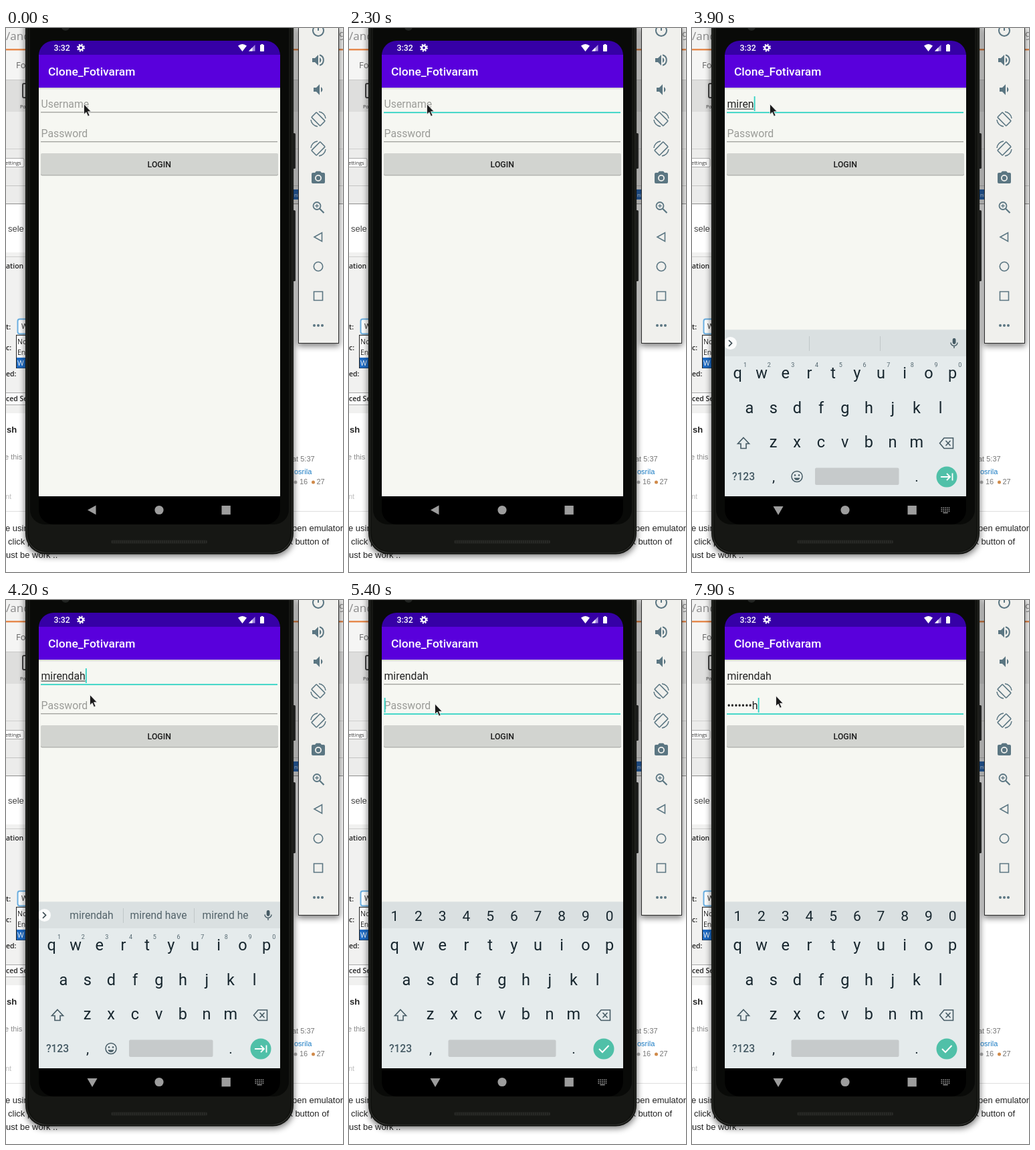
Recreate the animation shown at these times as an HTML page. Size 504x812 px, loop 8 s.

```html
<!DOCTYPE html>
<html lang="en">
<head>
<meta charset="utf-8">
<title>Login typing</title>
<style>
  html, body { margin: 0; width: 100%; height: 100%; overflow: hidden; background: #fff; }
  svg { display: block; width: 504px; height: 812px; }
  text { white-space: pre; }
  .r { font-family: Roboto, sans-serif; }
  .m { font-family: Roboto, sans-serif; font-weight: 500; }
  .a { font-family: "Liberation Sans", Arial, sans-serif; }
  .o { font-family: "Open Sans", sans-serif; }
  .mid { text-anchor: middle; }
</style>
</head>
<body>
<svg id="stage" viewBox="0 0 504 812" xmlns="http://www.w3.org/2000/svg"></svg>
<script>
const LOOP = 8000;
const USER = 'mirendah';
const TEAL = '#2fd3c4';
const stage = document.getElementById('stage');

const rect = (x, y, w, h, fill, extra = '') =>
  `<rect x="${x}" y="${y}" width="${w}" height="${h}" fill="${fill}" ${extra}/>`;
const text = (x, y, size, fill, str, cls = 'a', extra = '') =>
  `<text x="${x}" y="${y}" font-size="${size}" fill="${fill}" class="${cls}" ${extra}>${str}</text>`;
const circle = (x, y, r, fill, extra = '') =>
  `<circle cx="${x}" cy="${y}" r="${r}" fill="${fill}" ${extra}/>`;
const path = (d, fill, extra = '') => `<path d="${d}" fill="${fill}" ${extra}/>`;
const line = (d, color, width = 1.6) => path(d, 'none', `stroke="${color}" stroke-width="${width}"`);
const group = (id, body, extra = '') => `<g id="${id}" ${extra}>${body}</g>`;
const shadow = (x, y, w, h, r) =>
  rect(x - 1, y + 2, w + 2, h + 2, '#000', `rx="${r}" opacity=".5" filter="url(#soft)"`);

function backdrop() {
  return rect(0, 0, 504, 812, '#fff')
    + rect(0, 0, 504, 31, '#f2f2f1')
    + rect(0, 34, 504, 44, '#f5f5f4')
    + rect(0, 78, 504, 47, '#dededd')
    + rect(0, 125, 504, 137, '#ececeb')
    + rect(0, 31, 504, 2.5, '#e58a4e')
    + rect(0, 77, 504, 1, '#c8c8c7')
    + rect(0, 180, 504, 1, '#d0d0cf')
    + rect(0, 235, 504, 1, '#c4c4c3')
    + rect(0, 262, 504, 1, '#8e8e8d')
    + rect(0, 335, 32, 240, '#f1f1f0')
    + rect(0, 341, 32, 1, '#cfcfce')
    + rect(0, 721, 504, 1, '#dedede')
    + text(0, 18, 17, '#8a8a8a', '/and', 'o')
    + text(498, 18, 16, '#8a8a8a', '97', 'o')
    + text(15, 60, 13, '#666', 'Fo', 'o')
    + rect(25, 83, 12, 21, 'none', 'rx="2" stroke="#444" stroke-width="2"')
    + text(21, 119.5, 7, '#333', 'Po', 'o')
    + rect(-5, 194.5, 32, 13, '#fff', 'rx="2" stroke="#aaa"')
    + text(-1, 204, 7.5, '#333', 'ettings', 'o')
    + text(3, 304, 13, '#444', 'sele')
    + text(0, 359, 10.5, '#222', 'ation', 'o', 'font-weight="600"')
    + text(0, 450, 10.5, '#222', 't:', 'o', 'font-weight="600"')
    + rect(17.5, 434.5, 20, 22, '#fff', 'rx="3" stroke="#6aaee0" stroke-width="2"')
    + text(23, 449, 10.5, '#222', 'W', 'o')
    + rect(15.5, 458.5, 20, 49, '#fff', 'stroke="#222"')
    + rect(16, 492, 19, 15.5, '#1f6cc5')
    + text(17, 472, 10.5, '#222', 'No', 'o')
    + text(17, 488, 10.5, '#222', 'En', 'o')
    + text(17, 504, 10.5, '#fff', 'W', 'o')
    + text(0, 481, 10.5, '#222', 'c:', 'o', 'font-weight="600"')
    + text(0, 520, 10.5, '#222', 'ed:', 'o', 'font-weight="600"')
    + rect(-5, 544.5, 45, 18, '#fafafa', 'rx="2" stroke="#aaa"')
    + text(0, 557, 10.5, '#222', 'ced Se', 'o', 'font-weight="600"')
    + text(1, 604, 13, '#222', 'sh', 'a', 'font-weight="700"')
    + text(-2, 644, 11, '#8a8a8a', 'e this')
    + text(-1, 703, 11, '#c0c0c0', 'nt')
    + text(-1, 751, 13, '#222', 'e using')
    + text(3, 771, 13, '#222', 'click p')
    + text(0, 791, 13, '#222', 'ust be work ..')
    + rect(430, 241, 10, 15, '#2a66b0')
    + text(431, 252, 8, '#fff', 'ni', 'o')
    + text(428, 647, 11, '#777', 'at 5:37')
    + text(431, 666, 11, '#1b7cc4', 'osrila')
    + circle(433, 678, 2.5, '#aaa') + text(439, 681, 11, '#777', '16')
    + circle(459.5, 678, 2.5, '#d08a4a') + text(464.5, 681, 11, '#777', '27')
    + text(504, 751, 13, '#222', 'open emulator', 'a', 'text-anchor="end"')
    + text(483, 771, 13, '#222', 'k button of', 'a', 'text-anchor="end"');
}

function phone() {
  let grille = '';
  for (let x = 158; x < 301; x += 3) grille += rect(x, 765, 1.5, 4, '#2c2d2a');
  return shadow(29, -40, 401, 825, 31)
    + rect(429, 157, 4, 53, '#252624', 'rx="1.5"')
    + rect(429, 272, 4, 106, '#252624', 'rx="1.5"')
    + rect(29, -40, 401, 825.5, '#11120f', 'rx="31"')
    + rect(31, -40, 397, 823, 'none', 'rx="29" stroke="#30312e" stroke-width="1.2"')
    + rect(34, -40, 391, 821, '#161714', 'rx="26"')
    + rect(36, -40, 387, 781, '#090a08', 'rx="22"')
    + circle(89, -2, 6, '#222422')
    + rect(157, 764, 144, 6, '#1d1e1b', 'rx="3"') + grille
    + rect(49, 19, 361, 722, '#000', 'rx="22"');
}

function statusBar() {
  const teeth = 'stroke="#fff" stroke-width="2" stroke-dasharray="2 1.93"';
  return rect(49, 19, 361, 21, '#3600a6')
    + text(71.5, 34, 12.3, '#fff', '3:32', 'm')
    + circle(112, 29.5, 3.1, 'none', 'stroke="#fff" stroke-width="2.4"')
    + circle(112, 29.5, 5, 'none', teeth)
    + path('M347 26.5Q353.5 21.500 360 26.500L353.500 35z', '#fff')
    + path('M363 34.500L372.500 25V34.500z', '#a58be0')
    + path('M363 34.500L368.500 29V34.500z', '#fff')
    + rect(380, 25, 6, 10, '#fff', 'rx=".8"') + rect(381.7, 24, 2.6, 2, '#fff');
}

function app() {
  return rect(49, 40, 361, 659, '#f6f7f2')
    + rect(49, 89, 361, 3.5, 'url(#fade)')
    + rect(49, 40, 361, 49, '#5900dc')
    + statusBar()
    + text(63, 71, 17.4, '#fff', 'Clone_Fotivaram', 'm')
    + rect(52, 188, 355, 32.5, '#b4b5b1', 'rx="2"')
    + rect(52, 187, 355, 32, '#d2d4d0', 'rx="2"')
    + text(229.3, 207.5, 12.3, '#1c1c1c', 'LOGIN', 'm mid');
}

function field(id, y, hint) {
  return text(52.5, y, 15.8, '#9b9c98', hint, 'r', `id="${id}Hint"`)
    + text(52.5, y, 15.8, '#222', '', 'r', `id="${id}Text"`)
    + rect(52.5, y + 1.5, 0, 1, '#222', `id="${id}Mark"`)
    + rect(52, y + 6.3, 354, 1, '#858682', `id="${id}Line"`)
    + rect(53, y - 17, 1.8, 22, TEAL, `id="${id}Caret"`);
}

function keyboard() {
  const ink = '#17262e', soft = '#455a64', pitch = 35.7;
  const row = (str, x, y, size) => [...str].map((c, i) =>
    text(x + i * pitch, y, size, ink, c, 'r mid')).join('');
  const small = [...'1234567890'].map((c, i) =>
    text(79.5 + i * pitch, 506, 9, '#53666f', c, 'r mid')).join('');
  const words = [USER, 'mirend have', 'mirend he'].map((w, i) =>
    text(128 + i * 100, 476, 15.6, '#53636a', w, 'r mid')).join('');

  const suggest = circle(57.5, 470.5, 9.5, '#fbfcfc')
    + line('M55 466l4.500 4.500-4.500 4.500', '#37474f', 1.7)
    + rect(175, 460, 1, 22, '#c0c7c8') + rect(281, 460, 1, 22, '#c0c7c8')
    + rect(389.7, 463, 4.8, 9, soft, 'rx="2.4"')
    + line('M387 469.500a5 5 0 0 0 10 0M392 474.500v3.500', soft, 1.4);
  const face = circle(157, 669.5, 8, 'none', `stroke="${soft}" stroke-width="1.5"`)
    + circle(154, 667.5, 1.3, soft) + circle(160, 667.5, 1.3, soft)
    + path('M152.500 671.500h9a4.700 4.700 0 0 1-9 0z', soft);

  return rect(49, 450.5, 361, 248.5, '#e5ebec')
    + rect(49, 450.5, 361, 39.5, '#dae0e1')
    + row('qwertyuiop', 68.3, 522.7, 23.5)
    + row('asdfghjkl', 86, 574.7, 23.5)
    + row('zxcvbnm', 121.5, 626.3, 23.5)
    + line('M77 611.500l8.500 9h-4.500v7h-8v-7h-4.500z', soft)
    + line('M377 612h13.500v15.500h-13.500l-6.500-7.750zM379.500 616l7 7.500m0-7.500l-7 7.500', soft)
    + text(77, 675, 15.6, soft, '?123', 'm mid')
    + text(122, 677, 21, ink, ',', 'r mid') + text(336, 677, 21, ink, '.', 'r mid')
    + circle(381, 670, 15.5, '#50c0a8')
    + group('wordKeys', suggest + group('words', words) + small + face
      + rect(184, 656.5, 125.5, 25.5, '#c6cacb', 'rx="2"')
      + line('M372 670h14m-5-5l5 5-5 5M389.500 664.500v11', '#fff', 1.8))
    + group('passKeys', row('1234567890', 68.3, 479, 21)
      + rect(148.5, 656.5, 161, 25.5, '#c6cacb', 'rx="2"')
      + line('M374 670l5 5 9.500-10', '#fff', 2));
}

function navBar() {
  const grey = '#9d9d9d';
  let keys = '';
  for (let i = 0; i < 15; i++)
    keys += rect(372.5 + (i % 5) * 2.8, 715.5 + Math.floor(i / 5) * 2.6, 1.6, 1.5, grey);
  return path('M122 719.500L134.500 712.500V726.500z', grey, 'id="back"')
    + path('M121.500 714H136.500L129 727z', grey, 'id="down"')
    + circle(229, 719.5, 6.6, grey)
    + rect(322.5, 713, 13.3, 13.3, grey)
    + group('switcher', keys + rect(375.5, 723, 7.2, 1.3, grey));
}

function toolbar() {
  const c = '#5b7682';
  const at = (y, body) => `<g transform="translate(467 ${y})">${body}</g>`;
  const speaker = x => path(`M${x} -3h4l5-5v16l-5-5h-4z`, c);
  const wave = x => path(`M${x} -4a4.500 4.500 0 0 1 0 8z`, c);
  const turn = s => `<g transform="scale(${s} 1)">`
    + rect(-5.2, -9.2, 10.4, 18.4, 'none', `rx="1" stroke="${c}" stroke-width="1.6" transform="rotate(-45)"`)
    + line('M1-11a11 11 0 0 1 10 10M-1 11a11 11 0 0 1-10-10', c, 1.5) + '</g>';
  return shadow(437, -2, 61, 473, 1)
    + rect(437.5, -2, 60, 472.5, '#f0f0ed', 'stroke="#2b2b2b"')
    + at(4, line('M-4.800-6.500a8 8 0 1 0 9.600 0M0-10v10', c, 2))
    + at(48, speaker(-9) + wave(2) + line('M2 -7.700a8 8 0 0 1 0 15.400', c, 2))
    + at(92, speaker(-7) + wave(4))
    + at(136, turn(1)) + at(180, turn(-1))
    + at(224, rect(-10, -8, 20, 16, c, 'rx="2"') + path('M-5-8l2-2.200h6l2 2.200z', c)
      + circle(0, 0, 4.1, c, 'stroke="#f0f0ed" stroke-width="1.8"'))
    + at(268, circle(-2, -2.5, 5.5, 'none', `stroke="${c}" stroke-width="1.8"`)
      + line('M2 1.500l6.500 6.500', c, 2.2) + line('M-4.700-2.500h5.400M-2-5.200v5.400', c, 1.3))
    + at(312, line('M-6 0L5.500-6.500V6.500z', c))
    + at(356, circle(0, 0, 6.7, 'none', `stroke="${c}" stroke-width="1.6"`))
    + at(400, line('M-6.500-6.500h13v13h-13z', c))
    + at(444, [-6, 0, 6].map(x => circle(x, 0, 2, c)).join(''));
}

stage.innerHTML = `<defs>
    <filter id="soft" x="-30%" y="-10%" width="160%" height="120%"><feGaussianBlur stdDeviation="5"/></filter>
    <linearGradient id="fade" x2="0" y2="1"><stop stop-color="#cfcfcb"/><stop offset="1" stop-color="#f6f7f2"/></linearGradient>
    <clipPath id="screen"><rect x="49" y="19" width="361" height="722" rx="22"/></clipPath>
  </defs>`
  + backdrop() + phone()
  + group('view', app() + field('user', 119, 'Username') + field('pass', 163, 'Password')
    + group('keys', keyboard()) + navBar(), 'clip-path="url(#screen)"')
  + toolbar()
  + group('mouse', path('M0 0V15.500l3.500-3.300 2.600 6 2.500-1.100-2.600-5.800h4.700z', '#1a1a1a',
    'stroke="#f4f4f4" stroke-width=".8"'));

const el = id => document.getElementById(id);
const show = (id, on) => el(id).setAttribute('display', on ? 'inline' : 'none');

// Value of the last [time, value] step reached.
const step = (t, steps) => steps.reduce((v, s) => t >= s[0] ? s[1] : v, steps[0][1]);
// True after an odd number of toggle times.
const blink = (t, times) => times.filter(s => t >= s).length % 2 === 1;

const userSteps = [[0, 0], [3500, 1], [3700, 2], [3900, 5], [4000, 8]];
const passSteps = [[0, 0], [5800, 2], [6000, 3], [6200, 4], [6300, 5], [6500, 6], [6600, 7], [6700, 8]];
const mouseSteps = [[0, [116.5, 113.5]], [4000, [125, 146]], [4200, [125.5, 141.5]],
  [4500, [127, 149]], [4600, [128.5, 155]], [7700, [128.5, 151]], [7800, [127, 146]], [7900, [125.5, 143]]];

function setField(id, str, focus, caret, marked) {
  const node = el(id + 'Text'), rule = el(id + 'Line');
  if (node.textContent !== str) node.textContent = str;
  const width = str ? node.getComputedTextLength() : 0;
  show(id + 'Hint', !str);
  show(id + 'Caret', caret);
  el(id + 'Caret').setAttribute('x', 52.7 + width);
  el(id + 'Mark').setAttribute('width', marked ? width : 0);
  rule.setAttribute('fill', focus ? TEAL : '#858682');
  rule.setAttribute('height', focus ? 1.8 : 1);
}

function draw(t) {
  const typed = USER.slice(0, step(t, userSteps));
  const n = step(t, passSteps);
  const secret = n ? '•'.repeat(n - 1) + USER[n - 1] : '';
  const onPass = t >= 4800;

  setField('user', typed, t >= 400 && !onPass,
    blink(t, [500, 1000, 1500, 2300, 2700, 3300, 3500, 4500]), !onPass);
  setField('pass', secret, t >= 4600, blink(t, [4800, 5500, 5800, 7400, 7700]), false);

  show('keys', t >= 3900);
  show('wordKeys', t < 5400);
  show('passKeys', t >= 5400);
  show('words', t >= 4200 && t < 5000);
  show('back', t < 3300);
  show('down', t >= 3300);
  show('switcher', t >= 3300);
  el('mouse').setAttribute('transform', `translate(${step(t, mouseSteps)})`);
}

const start = performance.now();
function tick() {
  draw((performance.now() - start) % LOOP);
  requestAnimationFrame(tick);
}
tick();
</script>
</body>
</html>
```
